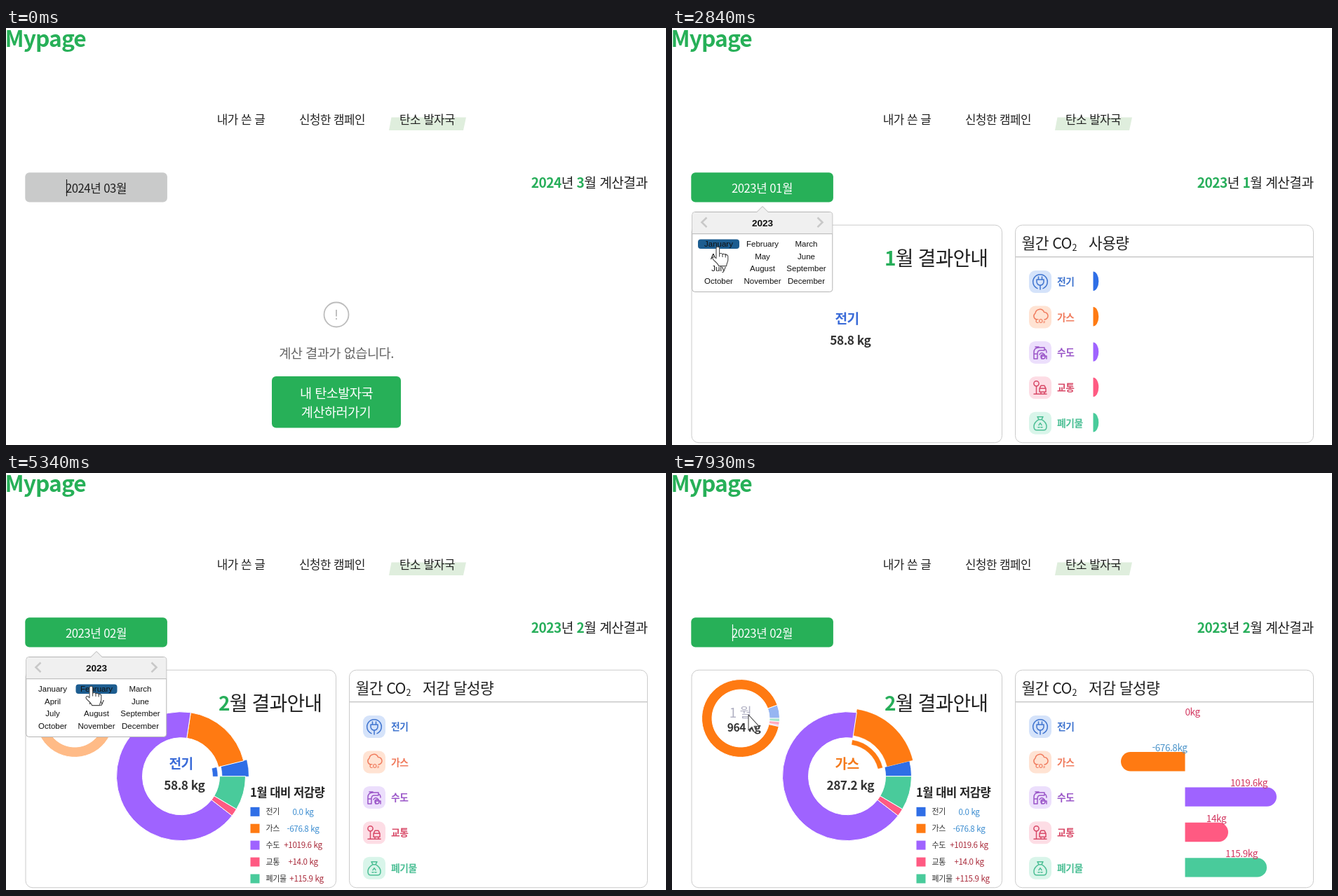
Recreate the animation shown at these times as an HTML page. Size 941 px wide and 595 px high, loop 8 s.

```html
<!DOCTYPE html>
<html lang="ko">
<head>
<meta charset="utf-8">
<title>Mypage</title>
<style>
html, body { margin: 0; width: 100%; height: 100%; overflow: hidden; background: #fff; }
svg { display: block; width: 941px; height: 595px; }
text { font-family: "Noto Sans CJK KR", "Noto Sans KR", "Noto Sans CJK", sans-serif; letter-spacing: -.03em; white-space: pre; }
.cal text { font-family: "Liberation Sans", Arial, sans-serif; letter-spacing: 0; }
.g { fill: #27ae5a; font-weight: 700; }
.icon { fill: none; stroke-width: 1.5; stroke-linecap: round; stroke-linejoin: round; }
</style>
</head>
<body>
<svg id="stage" viewBox="0 0 941 595"></svg>
<script>
const LOOP = 8000;
const T = { open: 180, green: 370, prevYear: 2050, pickJan: 2740, jan: 2820, janPie: 3220,
            pickFeb: 5240, feb: 5340, febBars: 5390, close: 6200, hover: 7000 };
const GREEN = '#27b058';
const NAMES = ['전기', '가스', '수도', '교통', '폐기물'];
const COLORS = ['#2f6ee6', '#ff7a12', '#9f63ff', '#ff5a82', '#49cb9b'];
const INK = ['#3f74cf', '#f07c5e', '#9a56c8', '#d84a68', '#4cbf95'];
const TILES = ['#d5e3fa', '#ffe3d3', '#ecdffc', '#fddde5', '#d9f5ea'];
const JAN = [58.8, 964, 5.2, 15.9, 14.5];
const FEB = [58.8, 287.2, 1024.8, 29.9, 130.4];
const DIFF = ['0.0', '-676.8', '+1019.6', '+14.0', '+115.9'];
const MONTHS = ['January', 'February', 'March', 'April', 'May', 'June', 'July',
                'August', 'September', 'October', 'November', 'December'];
// time, x, y of the pointer tip
const PATH = [
  [370, 148, 231], [560, 148, 231], [670, 122, 222], [1350, 122, 222], [1750, 47, 272],
  [2050, 47, 272], [2340, 65, 320], [2740, 65, 320], [2840, 65, 312], [4800, 65, 312],
  [5180, 121, 304], [5750, 121, 304], [6090, 485, 350], [6390, 485, 350], [6570, 430, 440],
  [6700, 270, 380], [6850, 140, 306], [6960, 140, 306], [7060, 130, 305], [7640, 130, 305],
  [7830, 98, 356], [7930, 109, 345], [8000, 109, 345]];
// from, to, x of the text caret
const CARETS = [[0, 370, 86.5], [970, 1500, 86.5], [6390, 6960, 171.5], [7450, 8000, 86.5]];

const rowY = i => 361.3 + 50.4 * i;
const clamp = v => Math.max(0, Math.min(1, v));

// y is the optical middle of the line
function text(str, x, y, size, fill = '#222', attrs = '') {
  return `<text x="${x}" y="${(y + size * .37).toFixed(1)}" font-size="${size}" fill="${fill}" ${attrs}>${str}</text>`;
}
const mid = (str, x, y, size, fill, weight = 400, id = '') =>
  text(str, x, y, size, fill, `text-anchor="middle" font-weight="${weight}" ${id && `id="${id}"`}`);
const rect = (x, y, w, h, r, fill, attrs = '') =>
  `<rect x="${x}" y="${y}" width="${w}" height="${h}" rx="${r}" fill="${fill}" ${attrs}/>`;

// CSS "ease"
function ease(x) {
  if (x <= 0) return 0;
  if (x >= 1) return 1;
  let lo = 0, hi = 1, s = x;
  for (let i = 0; i < 24; i++) {
    s = (lo + hi) / 2;
    const q = 1 - s;
    if (.75 * s * q * q + .75 * s * s * q + s ** 3 < x) lo = s; else hi = s;
  }
  return .3 * s * (1 - s) ** 2 + 3 * s * s * (1 - s) + s ** 3;
}

// ring piece, degrees counter-clockwise from 3 o'clock
function sector(cx, cy, r0, r1, a, b) {
  const p = (r, d) => {
    const k = d * Math.PI / 180;
    return `${(cx + r * Math.cos(k)).toFixed(2)} ${(cy - r * Math.sin(k)).toFixed(2)}`;
  };
  const big = b - a > 180 ? 1 : 0;
  return `M${p(r1, a)}A${r1} ${r1} 0 ${big} 0 ${p(r1, b)}L${p(r0, b)}A${r0} ${r0} 0 ${big} 1 ${p(r0, a)}Z`;
}

function slices(values, t, draw) {
  const sum = values.reduce((a, b) => a + b);
  let a = 0;
  return values.map((v, i) => {
    const b = a + 360 * t * v / sum, out = draw(i, a, b);
    a = b;
    return out;
  }).join('');
}

function mainPie(values, t, active) {
  const cx = 249.5, cy = 432.7;
  return slices(values, t, (i, a, b) => i === active
    ? `<path d="${sector(cx, cy, 59, 96.3, a, b)}" fill="${COLORS[i]}" stroke="${COLORS[i]}" stroke-width=".5"/>
       <path d="${sector(cx, cy, 45.7, 52, a, b)}" fill="${COLORS[i]}" stroke="${COLORS[i]}" stroke-width=".5"/>`
    : `<path d="${sector(cx, cy, 55, 92, a, b)}" fill="${COLORS[i]}" stroke="#fff"/>`);
}

const smallPie = active => slices(JAN, 1, (i, a, b) =>
  `<path d="${sector(98, 350, 41, 55.5, a, b)}" fill="${COLORS[i]}" stroke="#fff" opacity="${i === active ? 1 : .5}"/>`);

// bar with a round far end, w may be negative
function bar(x, i, w) {
  if (Math.abs(w) < .5) return '';
  const y = rowY(i) - 13.7, dir = Math.sign(w), r = Math.min(13.7, Math.abs(w)), sweep = dir > 0 ? 1 : 0;
  return `<path fill="${COLORS[i]}" d="M${x} ${y}H${x + w - dir * r}A${r} 13.7 0 0 ${sweep} ${x + w - dir * r} ${y + 27.4}H${x}Z"/>`;
}

const GLYPHS = [
  `<path d="M-4 9.5A10.3 10.3 0 1 1 4 9.5M-2.5-7v4M2.5-7v4M-5-3H5V0a5 5 0 0 1-10 0zM0 5v6"/>`,
  `<path d="M-5 3.5a5 5 0 0 1-2-9 6.5 6.5 0 0 1 12.5-1.5A5 5 0 0 1 6 3.5"/>`,
  `<path d="M-9 9V0q0-7 7-7H6v4H0q-4 0-4 5v7zM-9 2h5M6-5q3 1 3 5M-1 3q3-5 7 0M2 9V5h7v4M-7-8h5"/><circle cx="4" cy="6" r="3"/>`,
  `<circle cx="-5.5" cy="-6" r="3.6"/><path d="M-5.5-2v11M-9 9H9M-1 6V1l2-4h5l2 4v5zM-1 1h9M1 6v3M6 6v3"/>`,
  `<path d="M-4-9h8l-2 4h-4zM-2-5q-7 4-7 10 0 5 4 5H5q4 0 4-5 0-6-7-10M-2 3l2-3 2 3M-3 6h2M1 6h2"/>`];

function icons() {
  return NAMES.map((name, i) => {
    const y = rowY(i) + .8;
    const label = i === 1 ? `<text y="8.5" font-size="8" font-weight="700" text-anchor="middle" fill="${INK[1]}" stroke="none">CO₂</text>` : '';
    return rect(509, y - 16, 32, 32, 9, TILES[i]) +
      `<g class="icon" stroke="${INK[i]}" transform="translate(525 ${y})">${GLYPHS[i]}${label}</g>` +
      text(name, 549, y, 13.8, INK[i], 'font-weight="700"');
  }).join('');
}

function calendar() {
  const cells = MONTHS.map((m, i) => {
    const x = 66.5 + 62.5 * (i % 3), y = 308.3 + 17.5 * Math.floor(i / 3);
    return rect(x - 29.5, y - 6.8, 59, 13.6, 4, 'none', `id="cell${i}"`) +
      mid(m, x, y - .2, 11.5, '#111', 400, 'month' + i);
  }).join('');
  return rect(28.8, 262.5, 200, 114, 4, '#fff', 'stroke="#b4b4b4"') +
    `<path d="M29.3 293.5V266q0-3 3-3h193q3 0 3 3v27.5z" fill="#f0f0f0"/>
     <path d="M29 293.7H228.5" stroke="#b4b4b4"/>
     <path d="M120.5 263l8.5-8.5 8.5 8.5" fill="#f0f0f0" stroke="#b4b4b4"/>
     <g fill="none" stroke="#c8c8c8" stroke-width="2.6">
       <path id="prev" d="M49.5 270.5l-7 6.8 7 6.8"/><path d="M207.5 270.5l7 6.8-7 6.8"/></g>` +
    mid('', 129, 278, 13.6, '#111', 700, 'year') + cells;
}

const card = (x, w) => rect(x, 281.2, w, 310.5, 10, '#fff', 'stroke="#cbcbcb"');
const legend = NAMES.map((n, i) => {
  const y = 483.3 + 23.9 * i;
  return rect(348.5, y - 6.5, 13, 13, 0, COLORS[i]) + text(n, 370.5, y, 11, '#333') +
    mid(DIFF[i] + ' kg', i === 4 ? 428.5 : 423.5, y, 11.6, i < 2 ? '#3a8cd0' : '#a92a3a');
}).join('');

const janLabels = JAN.map((v, i) => text(v + 'kg', 830, rowY(i) - .3, 13.6, '#666')).join('');
const FEB_W = [0, -91.5, 130.5, 61.5, 116.5];
const FEB_X = [742, 709.5, 822.5, 776, 812];
const febLabels = DIFF.map((d, i) =>
  mid(parseFloat(d) + 'kg', FEB_X[i], rowY(i) - 20, 13.5, i === 1 ? '#4a93c9' : '#d2365f')).join('');

const stage = document.getElementById('stage');
stage.innerHTML =
  text('Mypage', -1.5, 15.2, 31.8, '#27b058', 'font-weight="700"') +
  `<path d="M549.5 127.5H656L652 146H546z" fill="#dfeedd"/>` +
  mid('내가 쓴 글', 335, 131, 16.9) + mid('신청한 캠페인', 465, 131, 16.8) + mid('탄소 발자국', 600.5, 131, 16.8) +
  `<text x="748.7" y="228.1" font-size="19.2" fill="#222"><tspan class="g" id="ry"></tspan>년 <tspan class="g" id="rm"></tspan>월 계산결과</text>` +
  rect(27.3, 206.2, 202.6, 42.2, 6, GREEN, 'id="field"') +
  mid('', 128.4, 228.3, 16.8, '#fff', 400, 'date') +
  `<path id="caret" d="M0 216V240" stroke-width="1.2"/>` +
  `<g id="empty"><circle cx="471" cy="409" r="17.5" fill="none" stroke="#bdbdbd" stroke-width="1.8"/>
    <path d="M471 402v9.5M471 414v2" stroke="#b5b5b5" stroke-width="1.7"/>` +
  mid('계산 결과가 없습니다.', 471, 464.5, 18.7, '#666') + rect(379, 497, 184, 73.5, 6, GREEN) +
  mid('내 탄소발자국', 471, 521.5, 18.6, '#fff', 500) + mid('계산하러가기', 470.5, 548, 18.6, '#fff', 500) + `</g>` +
  `<g id="result">` + card(28, 442.5) + card(489.5, 425) +
  `<path d="M490 326.7H914" stroke="#b0b0b0"/>` +
  text('월간 CO', 498.5, 307.3, 21.5) + text('2', 570.5, 313, 12.5) + text('', 594, 307.3, 21.5, '#222', 'id="cardTitle"') +
  `<text x="303" y="338.5" font-size="28" fill="#222"><tspan class="g" id="bigMonth"></tspan>월 결과안내</text>` +
  icons() + `<g id="bars"></g><g id="janLabels">${janLabels}</g><g id="pie"></g>` +
  mid('', 249.5, 415, 19.2, '', 700, 'pieName') + mid('', 254.3, 445.3, 17.3, '#333', 700, 'pieValue') +
  `<g id="feb"><g id="febLabels">${febLabels}</g><g id="small"></g>` +
  mid('1 월', 97.5, 341.5, 18.8, '#b1b1c3') + mid('', 102.5, 363.3, 15.5, '', 700, 'smallValue') +
  text('1월 대비 저감량', 348, 456, 16.6, '#222', 'font-weight="700"') + legend + `</g></g>` +
  `<g id="cal" class="cal">${calendar()}</g>
   <g id="pointer" fill="#fff" stroke="#4a4a4a" stroke-width="1.1" stroke-linejoin="round">
     <path id="hand" d="M-2 2.5a2.3 2.3 0 0 1 4.6 0v8c1-1.6 4-1.3 4.4.6 1-1.2 3.8-.8 4.2 1 1.2-1 3.6-.3 3.6 2v5c0 3-2 4.5-2.2 8.5h-11c-.5-3-5-6-8-9.5-1.8-2.6.6-4.6 2.6-3l1.8 1.6zM2.6 10.5v4M7 11.5v3.5M11.2 12.5v3"/>
     <path id="arrow" d="M0 0V22l5-4.6 3.4 7.6 3-1.3-3.3-7.4h7z"/></g>`;

const el = {};
stage.querySelectorAll('[id]').forEach(e => el[e.id] = e);
const show = (id, on) => el[id].style.display = on ? '' : 'none';
const put = (id, s) => { if (el[id].textContent !== String(s)) el[id].textContent = s; };

function drawField(t) {
  const k = clamp((t - T.open) / (T.green - T.open));
  const mix = (a, b) => `rgb(${a.map((v, i) => Math.round(v + (b[i] - v) * k))})`;
  const ink = mix([30, 30, 30], [255, 255, 255]);
  el.field.setAttribute('fill', mix([201, 202, 202], [39, 176, 88]));
  el.date.setAttribute('fill', ink);
  put('date', t < T.pickJan ? '2024년 03월' : t < T.pickFeb ? '2023년 01월' : '2023년 02월');
  const c = CARETS.find(([a, b]) => t >= a && t < b);
  show('caret', c);
  if (c) {
    el.caret.setAttribute('transform', `translate(${c[2]} 0)`);
    el.caret.setAttribute('stroke', ink);
  }
}

function drawCalendar(t) {
  const open = t >= T.open && t < T.close;
  show('cal', open);
  if (!open) return;
  put('year', t < T.prevYear ? 2024 : 2023);
  el.prev.setAttribute('stroke', t > 1700 && t < 2150 ? '#a3a3a3' : '#c8c8c8');
  el.month2.setAttribute('font-weight', t < T.prevYear ? 700 : 400);
  const fills = [
    t >= T.pickJan && t < T.pickFeb ? '#1d5d90' : 'none',
    t >= T.pickFeb ? '#1d5d90' : 'none',
    t < T.pickJan ? '#bad9f1' : 'none'];
  fills.forEach((f, i) => el['cell' + i].setAttribute('fill', f));
}

function drawResult(t) {
  const on = t >= T.jan, feb = t >= T.feb, active = t >= T.hover ? 1 : 0;
  show('empty', !on);
  show('result', on);
  put('ry', on ? 2023 : 2024);
  put('rm', feb ? 2 : on ? 1 : 3);
  if (!on) return;
  const values = feb ? FEB : JAN;
  const grow = ease((t - (feb ? T.febBars : T.jan)) / 400);
  put('bigMonth', feb ? 2 : 1);
  put('cardTitle', feb ? '저감 달성량' : '사용량');
  el.bars.innerHTML = NAMES.map((n, i) => feb ? bar(731.5, i, FEB_W[i] * grow) : bar(600.5, i, 221 * grow)).join('');
  show('janLabels', !feb && grow === 1);
  show('febLabels', grow === 1);
  show('feb', feb);
  const turn = feb ? 1 : ease((t - T.janPie) / 1480);
  el.pie.innerHTML = turn > 0 ? mainPie(values, turn, active) : '';
  put('pieName', NAMES[active]);
  el.pieName.setAttribute('fill', active ? '#f47a1c' : '#3a6bd8');
  put('pieValue', values[active] + ' kg');
  if (!feb) return;
  el.small.innerHTML = smallPie(active);
  put('smallValue', JAN[active] + ' kg');
  el.smallValue.setAttribute('fill', active ? '#333' : '#2a2f78');
}

function drawPointer(t) {
  show('pointer', t >= PATH[0][0]);
  const n = PATH.findIndex(p => p[0] > t);
  if (n < 1) return;
  const [t0, x0, y0] = PATH[n - 1], [t1, x1, y1] = PATH[n];
  const k = (t - t0) / (t1 - t0), x = x0 + (x1 - x0) * k, y = y0 + (y1 - y0) * k;
  const arrow = t >= T.close || x > 229;
  el.pointer.setAttribute('transform', `translate(${x.toFixed(2)} ${y.toFixed(2)})`);
  show('arrow', arrow);
  show('hand', !arrow);
}

const start = performance.now();
function frame() {
  const t = (performance.now() - start) % LOOP;
  drawField(t);
  drawCalendar(t);
  drawResult(t);
  drawPointer(t);
  requestAnimationFrame(frame);
}
frame();
</script>
</body>
</html>
```
